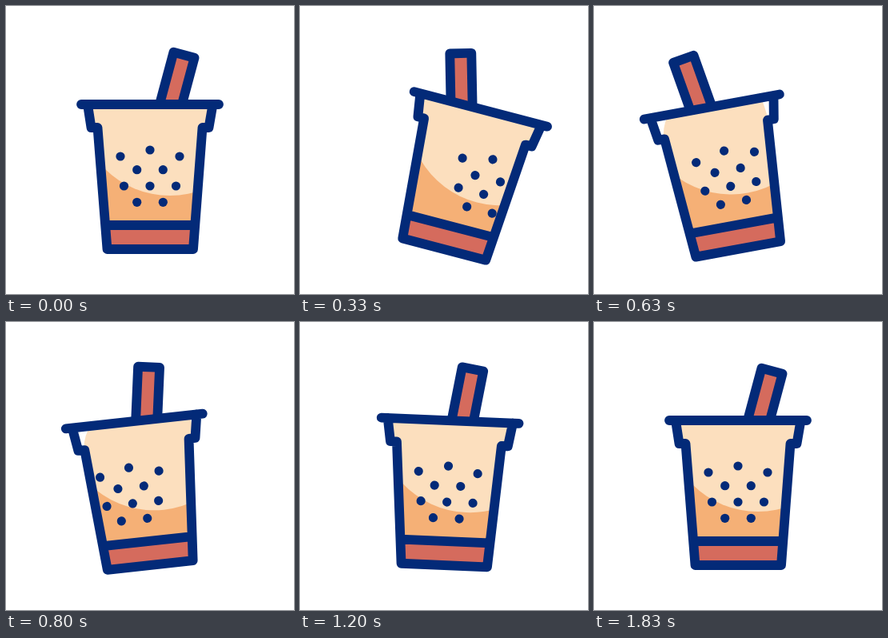
Recreate the animation shown at these times as an HTML page. Size 360x360 px, loop 2000 ms.

```html
<!DOCTYPE html>
<html lang="en">
<head>
<meta charset="utf-8">
<title>Bubble tea</title>
<style>
  html, body { margin: 0; width: 100%; height: 100%; overflow: hidden; background: #fff; }
  svg { display: block; width: 100vw; height: 100vh; }
  .line { fill: none; stroke: #032a78; stroke-width: 11.8; stroke-linecap: round; stroke-linejoin: round; }
  .red, .line.red { fill: #d56b5d; }
  .cream { fill: #fcdfbe; }
  .tea { fill: #f5b076; }
  .pearls { fill: #032a78; }
  .gap { fill: #fff; }
</style>
</head>
<body>
<svg viewBox="0 0 360 360">
  <defs>
    <clipPath id="inside">
      <path d="M102 123 L106.5 152 H114.5 L126.5 304 H234 L245.5 152 H253.5 L258.5 123 Z"/>
    </clipPath>
    <clipPath id="aboveRim"><rect y="-60" width="360" height="183"/></clipPath>
  </defs>
  <g id="cup">
    <g clip-path="url(#aboveRim)">
      <rect id="straw" class="line red" x="167.9" y="55.8" width="27" height="110"/>
    </g>
    <g clip-path="url(#inside)">
      <path class="tea" d="M114.5 152 H245.5 L234 304 H126.5 Z"/>
      <circle class="cream" cx="205" cy="121" r="116"/>
      <path id="gapLeft" class="gap" d="M70 120 H127 Q115 134 113.5 152 H70 Z"/>
      <path id="gapRight" class="gap" d="M290 120 H242 Q245 133 246.5 152 H290 Z"/>
      <rect class="red" x="120" y="274" width="120" height="30"/>
      <g id="pearls" class="pearls"></g>
    </g>
    <path class="line" d="M94 123 H266 M102 123 L106.5 152 H114.5 L126.5 304 H234 L245.5 152 H253.5 L258.5 123 M124.5 274 H236"/>
  </g>
</svg>
<script>
  const LOOP = 2000, FPS = 30, LAST_STEP = 55, MIDDLE = 180;

  // Key points are [time in ms, value]; every stretch eases in and out.
  const evenly = (beat, ...values) => values.map((v, i) => [i * beat, v]);
  const tilt = evenly(342, 0, 14.7, -12, 9.5, -4.3, 0);
  const lean = evenly(450, 15, -22, 13.2, 7.2, 15);
  const drift = [[0, 0], [400, 33], [810, -13.2], [1400, 5.2], [1833, 0]];

  function valueAt(keys, t) {
    const i = keys.findIndex(([time]) => time > t);
    if (i < 0) return keys[keys.length - 1][1];
    const [t0, a] = keys[i - 1], [t1, b] = keys[i];
    const x = (t - t0) / (t1 - t0);
    return a + (b - a) * x * x * (3 - 2 * x);
  }

  const [cup, straw, pearls, gapLeft, gapRight] =
    ['cup', 'straw', 'pearls', 'gapLeft', 'gapRight'].map(id => document.getElementById(id));

  const pearl = (dx, y) => `<circle cx="${MIDDLE + dx}" cy="${y}" r="5.6"/>`;
  const pair = (dx, y) => pearl(-dx, y) + pearl(dx, y);
  pearls.innerHTML = pearl(0, 180) + pair(37, 188) + pair(16.3, 204.7)
    + pearl(0, 225) + pair(32.5, 225) + pair(16.3, 245.3);

  const turn = (node, angle, y) =>
    node.setAttribute('transform', `rotate(${angle} ${node === straw ? 181.4 : MIDDLE} ${y})`);
  const slide = (node, dx) => node.setAttribute('transform', `translate(${dx} 0)`);

  function draw(ms) {
    const ticks = Math.floor((ms % LOOP) / 10);
    const step = Math.min(LAST_STEP, Math.floor((ticks + 0.34) * FPS / 100));
    const t = step * 1000 / FPS;
    const angle = valueAt(tilt, t);
    turn(cup, angle, 304);
    turn(straw, valueAt(lean, t), 214.6);
    slide(pearls, valueAt(drift, t));
    // the cream leaves the lid corners bare when the cup leans left
    slide(gapLeft, Math.min(0, -20 - 5 * angle));
    slide(gapRight, Math.max(0, 18 + 1.8 * angle));
  }

  const start = performance.now();
  function tick() {
    draw(performance.now() - start);
    requestAnimationFrame(tick);
  }
  tick();
</script>
</body>
</html>
```
